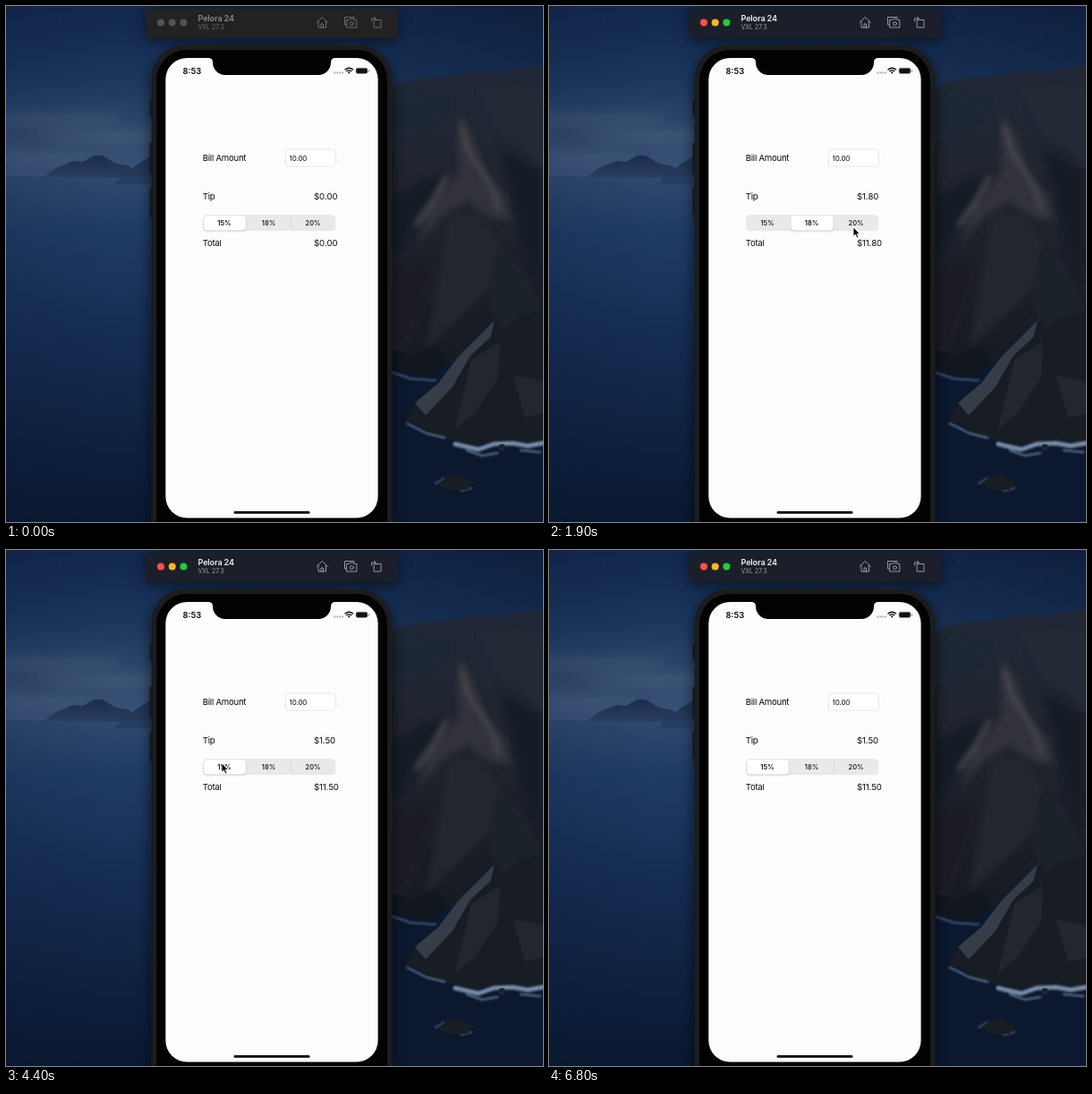
Animation, 600 px wide and 576 px high, one loop 6.9 s. Source, as an HTML page:

```html
<!DOCTYPE html>
<html lang="en">
<head>
<meta charset="utf-8">
<title>Tip calculator</title>
<style>
  html, body { margin: 0; width: 100%; height: 100%; overflow: hidden; background: #0b1a36; }
  svg { display: block; width: 100%; height: 100%; }
  text { font: 9.6px Inter, Roboto, sans-serif; letter-spacing: -.24px; fill: #0a0a0a; }
  .amount { letter-spacing: -.12px; font-kerning: none; font-feature-settings: "calt" 0; }
  .input { font-size: 8px; letter-spacing: -.1px; }
  .clock { font-size: 9.4px; font-weight: 600; letter-spacing: 0; }
  #segments text { font-size: 7.5px; font-weight: 500; letter-spacing: 0; text-anchor: middle; }
  #bar { fill: #1b1f29; }
  #device { font-size: 9px; font-weight: 600; letter-spacing: -.1px; fill: #f1f2f4; }
  #system { font-size: 7px; letter-spacing: 0; fill: #9a9da5; }
  #icons { fill: none; stroke: #a2a5ac; stroke-width: .9; stroke-linejoin: round; stroke-linecap: round; }
  .idle #bar { fill: #222223; }
  .idle #device { fill: #8a8a8b; }
  .idle #system { fill: #69696a; }
  .idle #icons { stroke: #747475; }
  .idle #lights circle { fill: #525253; }
</style>
</head>
<body>
<svg id="stage" viewBox="0 0 600 576" preserveAspectRatio="none">
  <defs>
    <linearGradient id="sky" x2="0" y2="1">
      <stop offset="0" stop-color="#11274c"/>
      <stop offset=".4" stop-color="#1b365c"/>
      <stop offset=".7" stop-color="#30496b"/>
      <stop offset="1" stop-color="#3b557b"/>
    </linearGradient>
    <linearGradient id="sea" x2="0" y2="1">
      <stop offset="0" stop-color="#30496f"/>
      <stop offset=".16" stop-color="#1f3b64"/>
      <stop offset=".5" stop-color="#142b50"/>
      <stop offset="1" stop-color="#0a1831"/>
    </linearGradient>
    <linearGradient id="island" x2="0" y2="1">
      <stop offset="0" stop-color="#1d2d49"/>
      <stop offset="1" stop-color="#283f62"/>
    </linearGradient>
    <linearGradient id="cliff" x2="0" y2="1">
      <stop offset="0" stop-color="#202837"/>
      <stop offset=".35" stop-color="#20242d"/>
      <stop offset="1" stop-color="#12161e"/>
    </linearGradient>
    <linearGradient id="dusk">
      <stop offset="0" stop-color="#08152e" stop-opacity=".15"/>
      <stop offset=".2" stop-color="#08152e" stop-opacity="0"/>
      <stop offset=".7" stop-color="#08152e" stop-opacity=".2"/>
      <stop offset="1" stop-color="#08152e" stop-opacity=".4"/>
    </linearGradient>
    <filter id="soft" x="-20%" y="-60%" width="140%" height="220%"><feGaussianBlur stdDeviation="6"/></filter>
    <filter id="haze" x="-20%" y="-20%" width="140%" height="140%"><feGaussianBlur stdDeviation="3"/></filter>
    <filter id="spray" x="-10%" y="-40%" width="120%" height="180%"><feGaussianBlur stdDeviation="1.2"/></filter>
    <filter id="shade" x="-20%" y="-20%" width="140%" height="160%">
      <feDropShadow dx="0" dy="1" stdDeviation="1" flood-opacity=".2"/>
    </filter>
  </defs>

  <!-- Coast at dusk -->
  <rect width="600" height="200" fill="url(#sky)"/>
  <g filter="url(#soft)" fill="#5f7490" opacity=".28">
    <ellipse cx="45" cy="126" rx="85" ry="7"/>
    <ellipse cx="115" cy="145" rx="75" ry="7"/>
    <ellipse cx="30" cy="170" rx="70" ry="7"/>
  </g>
  <rect y="190" width="600" height="386" fill="url(#sea)"/>
  <rect width="600" height="576" fill="url(#dusk)"/>
  <path d="M42 191L56 181 75 173 86 174 98 167 108 167 123 176 136 178 145 184 140 192Z" fill="url(#island)"/>
  <path d="M120 199L135 186 148 176 158 170 170 163V199Z" fill="url(#island)"/>
  <path d="M424 93L445 85 470 79 492 80 512 75 535 73 553 75 576 69 600 66V490L424 430Z" fill="url(#cliff)"/>
  <g filter="url(#haze)">
    <path d="M424 105L462 96 493 105 478 128 452 145 424 150Z" fill="#1d2636"/>
    <path d="M505 118L520 140 538 192 558 212 565 240 540 236 516 218 490 232 460 265 475 225 505 187Z" fill="#30333b"/>
    <path d="M424 218L462 196 496 186 464 232 440 275 424 282Z" fill="#181d27"/>
    <path d="M527 95L565 88 600 93V180L576 155 552 145Z" fill="#242a36"/>
    <path d="M552 160L600 185V310L578 275 566 215Z" fill="#191d27"/>
    <path d="M495 235L530 232 552 265 540 315 505 350 470 382 480 325Z" fill="#22262e"/>
    <path d="M424 310L460 278 480 292 466 343 446 385 424 392Z" fill="#1b1f28"/>
    <path d="M550 265L575 287 600 340V405L561 365 538 335Z" fill="#1c2029"/>
    <path d="M508 135L518 165 541 197 551 229 M493 190L475 222 458 245" fill="none" stroke="#4b4c52" stroke-width="4"/>
  </g>
  <path d="M424 405L455 409 490 400 550 390 600 425V576H424Z" fill="#0c182e"/>
  <path d="M424 382L455 389 482 380 495 397 473 415 449 411 424 406Z" fill="#11161f"/>
  <path d="M447 462L457 443 483 421 505 392 546 351 554 364 575 345 600 340V489L563 484 528 489 490 482Z" fill="#181c24"/>
  <path d="M457 443L483 421 505 392 546 351 541 370 519 390 499 425 469 457Z" fill="#363d48"/>
  <path d="M520 395L552 374 550 415 524 454 501 473Z" fill="#22262f"/>
  <path d="M566 412L600 419V454L580 460Z" fill="#22262e"/>
  <g filter="url(#spray)" fill="none" stroke-linecap="round" stroke-linejoin="round">
    <path d="M502 489L528 495 545 489 566 488 583 491 600 488" stroke="#788ba6" stroke-width="5"/>
    <path d="M515 496L532 502 549 499 M575 496L597 498 M448 466L470 477 490 482" stroke="#506681" stroke-width="2.5"/>
    <path d="M432 409L452 416 480 418 M480 533L490 527 M508 541L520 538" stroke="#455a74" stroke-width="2"/>
  </g>
  <path d="M483 535L492 525 505 522 521 532 515 540 494 540Z" fill="#191d25"/>
  <circle cx="554" cy="493" r="4" fill="#20242c"/>
  <g fill="#8a9bb7" opacity=".65">
    <circle cx="61" cy="16" r=".6"/><circle cx="131" cy="37" r=".5"/>
    <circle cx="458" cy="12" r=".6"/><circle cx="551" cy="33" r=".6"/><circle cx="508" cy="48" r=".5"/>
  </g>

  <!-- Window bar -->
  <g filter="url(#soft)" opacity=".4">
    <rect x="155" y="5" width="284" height="36" rx="7"/>
    <rect x="159" y="48" width="276" height="560" rx="40"/>
  </g>
  <rect id="bar" x="156" y="3" width="282" height="32.5" rx="5"/>
  <g id="lights">
    <circle cx="173" cy="18.5" r="4" fill="#ff5050"/>
    <circle cx="185.7" cy="18.5" r="4" fill="#fdb52c"/>
    <circle cx="198.4" cy="18.5" r="4" fill="#28c840"/>
  </g>
  <text id="device" x="214.5" y="17.3">Pelora 24</text>
  <text id="system" x="214.5" y="26.3">VXL 27.3</text>
  <g id="icons">
    <path d="M347 18.5L353.2 12.5 359.5 18.5 M349 17V24H357.5V17 M352 24V20H354.5V24"/>
    <path d="M380.5 21H378.5V12.5H389V14 M381 15.5H383.5L384.5 14.2H388L389 15.5H391.8V24H381Z"/>
    <circle cx="386.4" cy="19.7" r="2"/>
    <path d="M411.5 15.5H419V24H411.5Z M408.5 17V14H413 M411.5 12.2L413.3 14 411.5 15.8"/>
  </g>

  <!-- Handset -->
  <path d="M162.5 106V122 M162.5 154V185 M162.5 204V235 M431.5 165V214" stroke="#14161a" stroke-width="4" stroke-linecap="round"/>
  <rect x="162.5" y="43" width="269" height="570" rx="39" fill="#1b1c1f"/>
  <rect x="168" y="49" width="258" height="558" rx="34" fill="#020202"/>
  <rect x="178.3" y="58" width="237.3" height="513.5" rx="24" fill="#fdfdfd"/>
  <path d="M226 57H368V58Q363 58 363 63A14 14 0 0 1 349 77H245A14 14 0 0 1 231 63Q231 58 226 58Z" fill="#020202"/>
  <rect x="254.5" y="564" width="85" height="2.8" rx="1.4"/>

  <text class="clock" x="197.5" y="75.8">8:53</text>
  <path d="M366.5 74.5H377" stroke="#aaa" stroke-width="1.8" stroke-dasharray="1.8 1.1"/>
  <path d="M378.5 71.3Q383.2 67.2 388 71.3 M380.3 73Q383.2 70.6 386.2 73" fill="none" stroke="#080808" stroke-width="1.3"/>
  <path d="M381.8 74L383.2 75.7 384.7 74Q383.2 73 381.8 74Z"/>
  <rect x="391" y="69.2" width="13" height="6.2" rx="1.8" fill="#111" stroke="#999" stroke-width=".6"/>
  <path d="M405.5 71.3V73.5" stroke="#888"/>

  <!-- Form -->
  <text x="219.7" y="173">Bill Amount</text>
  <rect x="312.5" y="160" width="56" height="19" rx="3" fill="#fff" stroke="#e3e3e5" stroke-width=".8"/>
  <text class="input" x="316.5" y="172.5">10.00</text>
  <text x="219.7" y="215.8">Tip</text>
  <text id="tip" class="amount" x="344" y="215.8"></text>
  <text x="219.7" y="267.8">Total</text>
  <text id="total" class="amount" x="344" y="267.8"></text>

  <g id="segments">
    <rect x="220" y="233" width="148.3" height="18.3" rx="4.8" fill="#e9e9eb"/>
    <path id="leftRule" d="M268.7 237.5V247" stroke="#c9c9cc" stroke-width=".7"/>
    <path id="rightRule" d="M318.5 237.5V247" stroke="#c9c9cc" stroke-width=".7"/>
    <rect id="thumb" x="221" y="234" width="46.8" height="16.2" rx="4" fill="#fff" filter="url(#shade)"/>
    <text x="244" y="244.9">15%</text>
    <text x="293.5" y="244.9">18%</text>
    <text x="343" y="244.9">20%</text>
  </g>

  <path id="pointer" d="M0 0V10.2L2.4 8 4.1 11.8 5.9 11 4.2 7.3H7.4Z" fill="#050505" stroke="#fff" stroke-width=".8" stroke-linejoin="round"/>
</svg>
<script>
const $ = id => document.getElementById(id);
const labels = document.querySelectorAll('#segments text');
const LOOP = 6900, STEP = 100, SLIDE = 300;
const rates = [15, 18, 20];

// Pointer stops: time, x, y
const stops = [
  [400, 330, -15], [1000, 287, 245], [1500, 287, 245], [1900, 340, 247],
  [2200, 344, 243], [3300, 344, 243], [4000, 241, 238], [4700, 241, 238],
  [5100, 282, 45], [5300, 292, -15]
];
// Taps: time, segment
const taps = [[0, 0], [1300, 1], [2300, 2], [4100, 0]];

const ease = p => p * p * (3 - 2 * p);
const mix = (a, b, p) => a + (b - a) * p;
const money = n => '$' + n.toFixed(2);

function pointerAt(t) {
  const i = stops.findIndex(s => s[0] > t);
  if (i < 1) return null;
  const a = stops[i - 1], b = stops[i];
  const p = ease((t - a[0]) / (b[0] - a[0]));
  return [mix(a[1], b[1], p), mix(a[2], b[2], p)];
}

function draw(t) {
  const n = taps.filter(tap => tap[0] <= t).length - 1;
  const [start, chosen] = taps[n];
  const before = n ? taps[n - 1][1] : chosen;
  const slide = ease(Math.min(1, (t - start + STEP) / SLIDE));
  const tip = n ? rates[chosen] / 10 : 0;

  $('stage').classList.toggle('idle', n === 0);
  $('thumb').setAttribute('x', 221 + 49.5 * mix(before, chosen, slide));
  $('leftRule').style.opacity = chosen === 2 ? 1 : 0;
  $('rightRule').style.opacity = chosen === 0 ? 1 : 0;
  labels.forEach((label, i) => label.style.fontWeight = i === chosen ? 600 : 500);
  $('tip').textContent = money(tip);
  $('total').textContent = money(n ? 10 + tip : 0);

  const at = pointerAt(t);
  $('pointer').style.display = at ? '' : 'none';
  if (at) $('pointer').setAttribute('transform', `translate(${at})`);
}

function tick() {
  const t = performance.now() % LOOP;
  draw(Math.floor(t / STEP) * STEP);
  requestAnimationFrame(tick);
}
tick();
</script>
</body>
</html>
```
